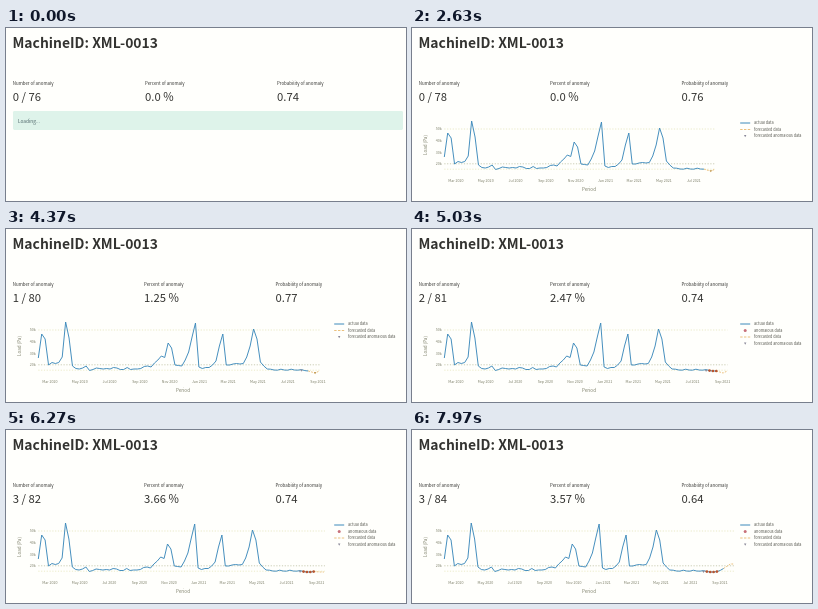
Animation of 400x173 px, one loop 8 s. Source, as an HTML page:

```html
<!DOCTYPE html>
<html lang="en">
<head>
<meta charset="utf-8">
<title>Machine anomaly monitor</title>
<style>
html, body { margin: 0; width: 100%; height: 100%; overflow: hidden; background: #fffffc; }
svg { display: block; width: 400px; height: 173px; font-family: "Noto Sans CJK JP", "Noto Sans CJK", "Noto Sans", sans-serif; fill: #333330; }
.title { font-size: 13.9px; font-weight: 700; }
.label { font-size: 4.4px; font-weight: 500; }
.value { font-size: 11.3px; }
.note { font-size: 4.8px; fill: #4c6468; }
.tick { font-size: 3.65px; fill: #7d7f69; }
.axis { font-size: 4.6px; fill: #7d7f69; }
.legend { font-size: 3.75px; fill: #53544c; }
.mid { text-anchor: middle; }
.end { text-anchor: end; }
</style>
</head>
<body>
<svg id="stage" viewBox="0 0 400 173">
  <text class="title" x="6.5" y="20">MachineID: XML-0013</text>
  <g id="metrics"></g>
  <g id="loading">
    <rect x="7" y="83" width="390" height="19" rx="1.4" fill="#def3ea"/>
    <text class="note" x="12" y="94.6">Loading...</text>
  </g>
  <g id="chart"></g>
</svg>
<script>
const LOOP = 8000, LEFT = 32.3;
const BLUE = '#3d8abb', GOLD = '#e6b25e', RED = '#b9552f', GREY = '#8a8898';
const el = id => document.getElementById(id);

// Start time, anomalies, samples, percent, probability
const steps = [
  [0, 0, 76, '0.0', '0.74'],
  [2050, 0, 77, '0.0', '0.75'],
  [2600, 0, 78, '0.0', '0.76'],
  [3150, 0, 79, '0.0', '0.77'],
  [3700, 1, 80, '0.0', '0.77'],
  [4650, 2, 81, '2.47', '0.74'],
  [5650, 3, 82, '3.66', '0.74'],
  [6650, 3, 83, '3.61', '0.75'],
  [7500, 3, 84, '3.57', '0.64']
];
const months = ['Mar 2020', 'May 2020', 'Jul 2020', 'Sep 2020', 'Nov 2020',
  'Jan 2021', 'Mar 2021', 'May 2021', 'Jul 2021', 'Sep 2021'];

// Weekly load as plot heights
const load = [129, 105, 110, 136, 133.5, 134.5, 133.5, 128, 93, 109, 137, 139.5,
  140, 139, 137, 141.5, 140.5, 139, 139.5, 140, 139.5, 140, 138.5, 139, 140.5,
  140.5, 138.5, 140.5, 140, 140, 139.5, 137.5, 137, 138, 134, 131, 127, 128.5,
  114, 119, 136, 136.5, 137, 131, 123, 108, 94, 138, 139.5, 138.5, 138.5, 136,
  132, 117, 105, 136, 136, 135, 134.5, 135, 134.5, 128, 117, 100, 110, 133, 137, 140];
while (load.length < 77) load.push(140.8 + 0.6 * Math.sin(load.length * 2.1));
load.push(140.6, 141.6, 142, 142, 141.6, 140.4, 138.4);

const text = (cls, x, y, s) => `<text class="${cls}" x="${x}" y="${y}">${s}</text>`;
const path = (pts, color, dash = '', width = 0.8) =>
  `<polyline points="${pts.map(p => p.join()).join(' ')}" fill="none" stroke="${color}"
    stroke-width="${width}" stroke-linejoin="round" stroke-dasharray="${dash}"/>`;
const dot = (x, y, color, r = 1.35) => `<circle cx="${x}" cy="${y}" r="${r}" fill="${color}"/>`;
const mark = (x, y, color) =>
  `<path d="M${x - 1.2} ${y - 1}h2.4l-1.2 2.2z" fill="${color}"/>`;

function metrics(step, count, percent) {
  const prob = step[4];
  const cols = step[0] ? [6.8, 138, 269.5] : [6.8, 139, 271];
  const names = ['Number of anomaly', 'Percent of anomaly', 'Probability of anomaly'];
  const values = [count, percent + ' %', prob];
  return cols.map((x, i) => text('label', x, 57.3, names[i]) + text('value', x, 72.8, values[i])).join('');
}

function legend(x, flagged) {
  const rows = [['actual data', y => path([[x, y], [x + 10, y]], BLUE, '', 1)]];
  if (flagged) rows.push(['anomalous data', y => dot(x + 5, y, '#c8707a', 1.5)]);
  rows.push(['forecasted data', y => path([[x, y], [x + 10, y]], GOLD, '2.4 1.4')]);
  rows.push(['forecasted anomalous data', y => mark(x + 5, y, GREY)]);
  return rows.map(([name, symbol], i) => {
    const y = 95 + i * 6.5;
    return symbol(y) + text('legend', x + 13.8, y + 1.3, name);
  }).join('');
}

function chart(n) {
  const week = n < 77 ? 3.58 : n < 81 ? 3.417 : n < 83 ? 3.4 : n < 84 ? 3.375 : 3.366;
  const at = i => LEFT + i * week;
  const right = at(n + 2.3);
  const flagged = n > 80;
  let out = '';

  [['50k', 101], ['40k', 112.7], ['30k', 124.3], ['20k', 136]].forEach(([s, y]) => {
    out += text('tick end', 29.8, y + 1.3, s);
  });
  [[101, '#dedeaa'], [135.8, '#adb08c'], [141.2, '#e2e0ac']].forEach(([y, c]) => {
    out += path([[LEFT, y], [right, y]], c, '1.2 1.6', 0.65);
  });

  const first = n < 77 ? 45.3 : 44;
  const start = Date.UTC(2020, 2, 1);
  months.forEach((s, i) => {
    const days = (Date.UTC(2020, 2 + i * 2, 1) - start) / 864e5;
    const x = first + days * week / 7;
    if (x < right + 3) out += text('tick mid', x, 154.2, s);
  });
  out += text('axis mid', 177, 162.7, 'Period');
  out += `<text class="axis mid" transform="translate(14.6 117) rotate(-90)">Load (Pa)</text>`;

  out += path(load.slice(0, n).map((y, i) => [at(i), y]), BLUE, '', 0.95);

  const end = load[n - 1];
  const rise = n === 84 ? -4.4 : n === 83 ? -1.5 : 0.4;
  const ahead = [[at(n - 1), end], [at(n + 1), end + (n < 82 ? 2 : rise)], [at(n + 2), end + rise]];
  out += path(ahead, GOLD, '1.8 1.2');
  if (flagged) {
    for (let i = 78; i < Math.min(n, 82); i++) out += dot(at(i), load[i], RED);
    out += mark(at(77), 141.8, GREY);
  } else {
    out += mark(ahead[1][0], ahead[1][1], '#c09a55');
    if (n > 77) out += mark(at(77), 141.5, GREY);
  }
  return out + legend(n < 77 ? 330.5 : 328.2, flagged);
}

const last = {};
function paint(id, key, draw) {
  if (last[id] === key) return;
  last[id] = key;
  el(id).innerHTML = draw();
}

const stepAt = t => steps.filter(s => s[0] <= t).pop();

function frame(now) {
  const t = now % LOOP;
  const step = stepAt(t);
  const ready = t >= 1250;
  // The plot refreshes shortly after the figures
  const shown = stepAt(Math.max(0, t - 200))[2];
  const percent = step[2] === 80 && t - step[0] > 150 ? '1.25' : step[3];

  paint('metrics', step[2] + percent, () => metrics(step, `${step[1]} / ${step[2]}`, percent));
  paint('chart', shown, () => chart(shown));
  el('loading').style.display = ready ? 'none' : '';
  el('chart').style.display = ready ? '' : 'none';
  requestAnimationFrame(frame);
}
requestAnimationFrame(frame);
</script>
</body>
</html>
```
